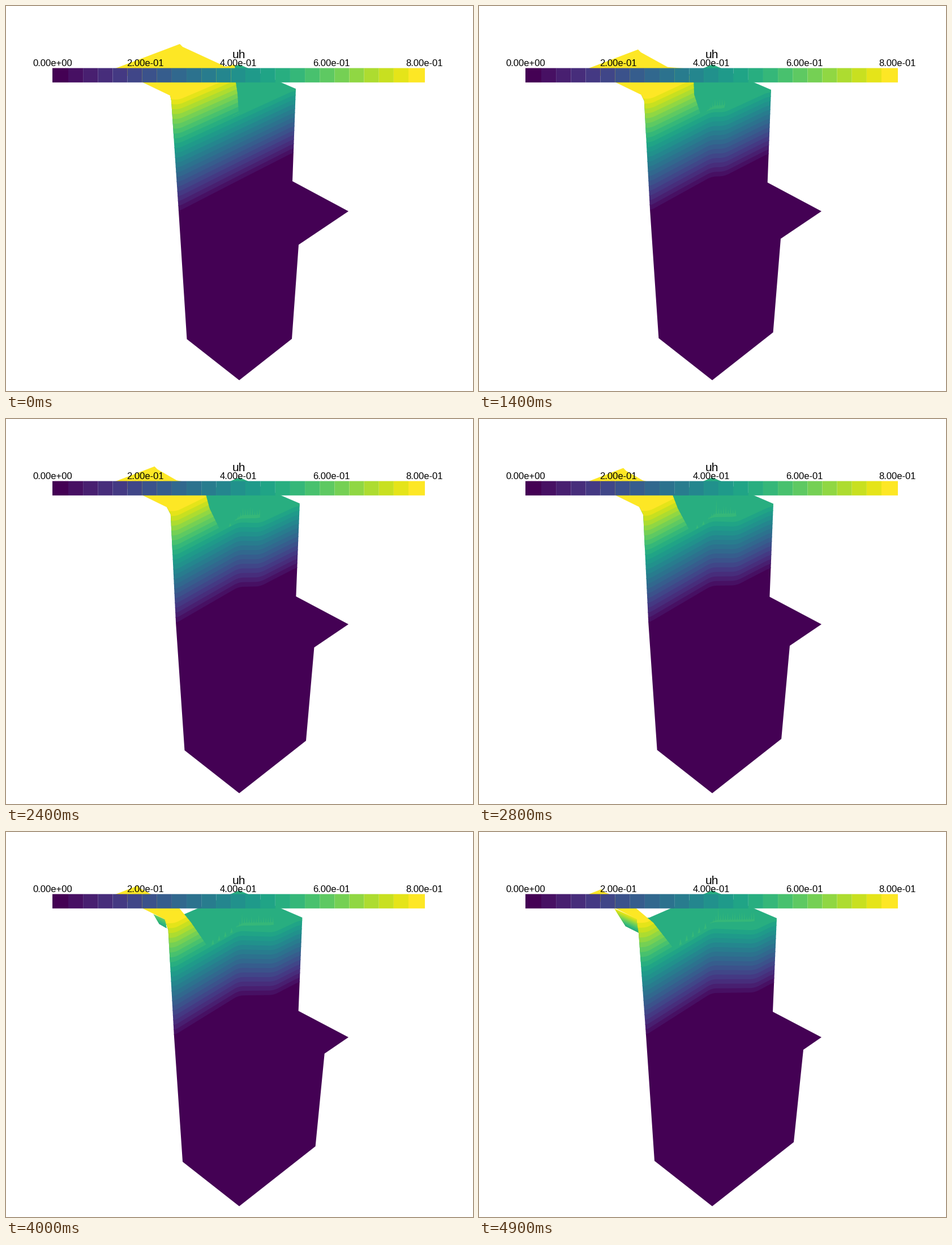
These frames come from a looping animation (825 px wide and 679 px high, 5 s). A matplotlib script:

```python
import numpy as np
import matplotlib.pyplot as plt
from matplotlib.animation import FuncAnimation
from matplotlib.patches import Polygon, Rectangle

W, H, DPI = 825, 679, 100
FRAMES, INTERVAL = 50, 100
BANDS = 25
PLATEAU = 15        # colour band of the flat upper step
COLORS = plt.cm.viridis(np.linspace(0, 1, BANDS))
XS = np.arange(170.0, 620.0)
STEP = np.interp(XS, [290, 520], [8.6, 7.7])   # band height, shrinking with depth
TOP, BOTTOM = np.full_like(XS, 60), np.full_like(XS, 670)

fig = plt.figure(figsize=(W / DPI, H / DPI), dpi=DPI, facecolor="white")
ax = fig.add_axes([0, 0, 1, 1])
ax.set(xlim=(0, W), ylim=(H, 0))
ax.axis("off")
artists = []


def move(start, end, u):
    start, end = np.array(start, float), np.array(end, float)
    return start + (end - start) * u


def shape(points, color, clip=None):
    patch = Polygon(points, closed=True, fc=color, ec="none", lw=0)
    ax.add_patch(patch)
    if clip is not None:
        patch.set_clip_path(clip)
    artists.append(patch)
    return patch


def stripe(lower, upper, color, clip):
    # A small overlap hides the seam to the next stripe.
    shape(np.r_[np.c_[XS, lower], np.c_[XS, upper - 1.5][::-1]], color, clip)


def front_curve(u):
    """Upper edge of the dark region: a slope with a widening flat middle."""
    knots = move([(305, 362), (411, 307.5), (412, 307), (508, 258)],
                 [(295, 358), (411, 284), (487, 283), (521, 265)], u)
    curve = np.pad(np.interp(XS, *knots.T), 8, mode="edge")
    return np.convolve(curve, np.ones(17) / 17, mode="valid")


def left_edge(u):
    return np.array([move((290, 158), (278, 153), u),
                     move((292, 167), (282, 178), u ** 3),
                     move((305, 362), (295, 358), u),
                     move((319.5, 587.5), (310, 580), u ** 1.2)])


def right_edge(u):
    return move([(512, 146), (506, 309), (517, 421), (505, 587)],
                [(526, 152), (519, 317), (573, 384), (556, 547)], u)


def ridge_line(u):
    """Top and right side of the high yellow step."""
    peak = move((307, 67), (216, 101), u)
    return np.array([peak, peak + (5, 5),
                     move((388, 107), (229, 109), u ** 0.85),
                     move((404, 103), (264, 128), u),
                     move((406, 135), (278, 135), u ** 1.25),
                     move((409, 155), (308, 160), u),
                     move((411, 187), (345, 207), u)])


def draw_wall(frame):
    """Side wall that opens at the far left late in the loop."""
    w = (frame - 30) / 19
    if w <= 0:
        return
    top_left, low_left, low_right, top_right = move(
        [(284, 156), (284, 158), (284, 160), (284, 156)],
        [(239, 135), (259, 166), (283, 178), (279, 153)], w)
    count = 1 + round(8 * w ** 1.5)
    for n in range(count):
        t = n / count
        shape([move(top_left, low_left, t), low_left, low_right,
               move(top_right, low_right, t)], COLORS[PLATEAU + count - 1 - n])


def draw_teeth(frame, u, curve, foot):
    rng = np.random.default_rng(frame)
    start, end = 400 + 8 * u, 412 + 75 * u
    base = lambda x: np.interp(x, XS, curve) - 119 - 6 * u ** 2
    valley = 4 + 8 * u * (1 - u)
    growth = min(1, 4 * u)
    grid = np.arange(start, end, 4.2)
    top = []
    for n, x in enumerate(grid):
        rise = growth * min(1, (n + 1) / 4)
        tip = valley + 6 + 9 * rng.random() + 12 * (rng.random() > 0.9)
        for dx, height in [(0, valley), (1.2, valley), (2.1, tip), (3, valley)]:
            top.append((x + dx, base(x) - height * rise))
    shape(top + [(x, base(x)) for x in np.r_[grid, end][::-1]], COLORS[PLATEAU + 1])

    for x in np.arange(start - 8, foot + 8, -11):
        y = base(x) + 4
        shape([(x - 2.5, y + 2), (x, y - 10 * u), (x + 2, y)], COLORS[PLATEAU + 1])


def draw(frame):
    while artists:
        artists.pop().remove()
    u = frame / (FRAMES - 1)
    left, right, ridge = left_edge(u), right_edge(u), ridge_line(u)
    curve = front_curve(u)
    level = lambda k: curve - STEP * k

    draw_wall(frame)
    body = shape([(412, 103), right[0], right[1], (605, 362), right[2], right[3],
                  (412, 660), *left[::-1], (301, 151)], "none")
    stripe(BOTTOM, curve, COLORS[0], body)
    for band in range(1, PLATEAU):
        stripe(level(band - 1), level(band), COLORS[band], body)
    stripe(level(PLATEAU - 1), TOP, COLORS[PLATEAU], body)
    draw_teeth(frame, u, curve, ridge[-1, 0])

    foot = ridge[-1] + (0, 60)
    slab = shape([(188, 112), *ridge, foot, *left[2::-1], (242, 135)], "none")
    for band in range(PLATEAU + 1, BANDS - 1):
        stripe(level(band - 1), level(band), COLORS[band], slab)
    stripe(level(BANDS - 2), TOP, COLORS[-1], slab)
    return artists


def draw_colorbar():
    edges = np.r_[82, np.linspace(110, 711, BANDS - 1), 740]
    for a, b, color in zip(edges[:-1], edges[1:], COLORS):
        ax.add_patch(Rectangle((a, 109.5), b - a, 25.3, fc=color, ec="none", lw=0,
                               snap=False, zorder=5))
    label = dict(ha="center", va="baseline", family="Liberation Sans", color="black", zorder=6)
    for n in range(5):
        ax.text(82 + 164.25 * n, 105.5, f"{0.2 * n:.2e}", fontsize=16.6 * 0.72, **label)
    ax.text(411.5, 92, "uh", fontsize=21 * 0.72, **label)


draw_colorbar()
animation = FuncAnimation(fig, draw, frames=FRAMES, interval=INTERVAL,
                          init_func=lambda: artists, repeat=True, repeat_delay=0)
plt.show()
```
